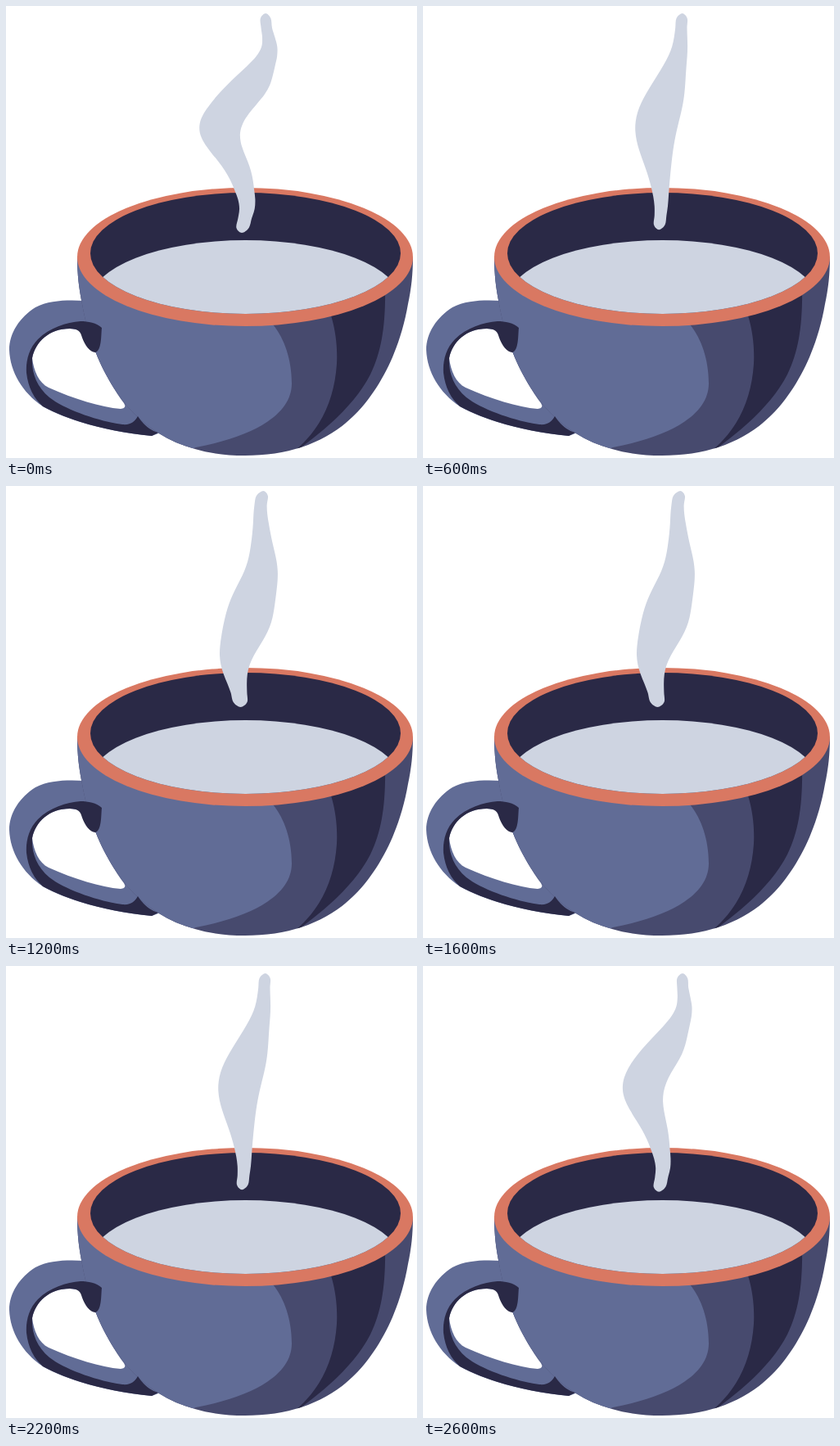
Write an HTML page that moves like this. It is 502 px wide and 552 px high and loops after 2800 ms.

```html
<!DOCTYPE html>
<html lang="en">
<head>
<meta charset="utf-8">
<title>Steaming cup</title>
<style>
  html, body { margin: 0; width: 100%; height: 100%; overflow: hidden; background: #fff; }
  svg { display: block; width: 502px; height: 552px; }
  .pale { fill: #ced4e1; }
  .light { fill: #616c96; }
  .mid { fill: #474a6e; }
  .dark { fill: #2a2946; }
  .rim { fill: #d97862; }
</style>
</head>
<body>
<svg viewBox="0 0 502 552">
  <defs>
    <clipPath id="bowl">
      <path d="M87 306C87 328 89 345 93 364C97 387 103 407 110 424C120 450 140 483 161 502C193 533 238 549 292 549C346 549 391 533 423 502C444 483 464 450 474 424C481 407 487 387 491 364C495 345 497 328 497 306Z"/>
    </clipPath>
    <clipPath id="mouth"><ellipse cx="292.5" cy="302" rx="189.5" ry="74"/></clipPath>
  </defs>

  <!-- handle -->
  <path class="light" d="M96 360C76 359 53 359 36 368C17 380 4 399 4 420C5 447 20 472 45 489C75 506 125 520 178 525L186 522L160 480Z"/>
  <path fill="#fff" d="M32 430C36 410 53 394 78 394L92 396L110 424C120 449 134 472 144 485Q148 491 140 492C116 490 83 480 52 466C40 460 34 446 32 430Z"/>

  <!-- bowl -->
  <g clip-path="url(#bowl)">
    <rect class="mid" x="80" y="300" width="420" height="252"/>
    <path class="light" d="M80 300H300L326 389C340 406 349 432 349 461C349 498 305 525 232 539L200 552H80Z"/>
    <path class="dark" d="M390 350L397 378C403 398 405 418 404 437C401 482 384 519 348 547L352 545C393 516 427 485 445 450C459 421 464 389 463 340Z"/>
  </g>

  <!-- handle shade -->
  <path class="dark" d="M117 393C111 387 100 385 91 385C74 386 53 393 39 407C28 418 24 434 25 448C27 466 34 479 45 489C80 508 128 520 178 525L186 521C175 518 167 510 161 501C157 508 152 512 142 511C113 507 72 493 53 478C37 465 31 447 32 430C36 410 53 394 78 394C89 394 91 398 93 405C96 414 103 423 109 423C117 421 116 402 117 393Z"/>

  <!-- rim and drink -->
  <ellipse class="rim" cx="292" cy="306.5" rx="205" ry="84.5"/>
  <ellipse class="dark" cx="292.5" cy="302" rx="189.5" ry="74"/>
  <ellipse class="pale" cx="292.5" cy="360" rx="189.5" ry="74" clip-path="url(#mouth)"/>

  <path id="steam" class="pale"/>
</svg>
<script>
const STEP = 200;
const STEPS = 7;
const ROWS = 22;

// sway, span: size and reach of the main bend; curl, lean: side bends;
// grow, peak, rise, fall: how the plume swells and thins
const curled = { top: 9, bottom: 277, sway: -40, span: 48, curl: 1, lean: 0,
                 grow: 45, peak: 112, rise: 46, fall: 98 };
const slim = { top: 9, bottom: 272, sway: -9, span: 66, curl: 0, lean: 0,
               grow: 40, peak: 140, rise: 68, fall: 66 };
const bent = { top: 6, bottom: 270, sway: -3, span: 72, curl: 0, lean: 1,
               grow: 46, peak: 162, rise: 85, fall: 68 };

const bump = (d, reach) => Math.exp(-((d / reach) ** 2));

const blend = (a, b, k) => Object.fromEntries(
  Object.keys(a).map(key => [key, a[key] + (b[key] - a[key]) * k]));

const poseAt = step =>
  step < 4 ? blend(curled, slim, step / 4) : blend(slim, bent, (step - 4) / 2);

const centre = (p, y) => 316 - 0.107 * (y - 15)
  + p.sway * bump(y - 150, p.span)
  + p.curl * (10 * bump(y - 52, 25) + 4 * bump(y - 245, 18))
  + p.lean * (7 * bump(y - 100, 35) - 13 * bump(y - 218, 38) - 4 * bump(y - 22, 25));

const width = (p, y) => 12 + p.grow * bump(y - p.peak, y < p.peak ? p.rise : p.fall);

// Closed Catmull-Rom curve as Bezier segments
function curve(pts) {
  const n = pts.length;
  const at = i => pts[(i + n) % n];
  let d = "M" + at(0);
  for (let i = 0; i < n; i++) {
    const [p, a, b, q] = [at(i - 1), at(i), at(i + 1), at(i + 2)];
    const c1 = a.map((v, k) => v + (b[k] - p[k]) / 6);
    const c2 = b.map((v, k) => v - (q[k] - a[k]) / 6);
    d += `C${c1} ${c2} ${b}`;
  }
  return d + "Z";
}

function outline(p) {
  const top = Math.max(p.top, 6);
  const first = top + 6, last = p.bottom - 6;
  const left = [], right = [];
  for (let i = 0; i <= ROWS; i++) {
    const y = first + (last - first) * i / ROWS;
    const x = centre(p, y), half = width(p, y) / 2;
    left.unshift([x - half, y]);
    right.push([x + half, y]);
  }
  return curve([[centre(p, top), top], ...right, [centre(p, p.bottom), p.bottom], ...left]);
}

const steam = document.getElementById("steam");
let shown = -1;

function draw() {
  const s = Math.floor(performance.now() / STEP) % (2 * STEPS);
  const step = Math.min(s, 2 * STEPS - s);
  if (step !== shown) steam.setAttribute("d", outline(poseAt(shown = step)));
  requestAnimationFrame(draw);
}
draw();
</script>
</body>
</html>
```
